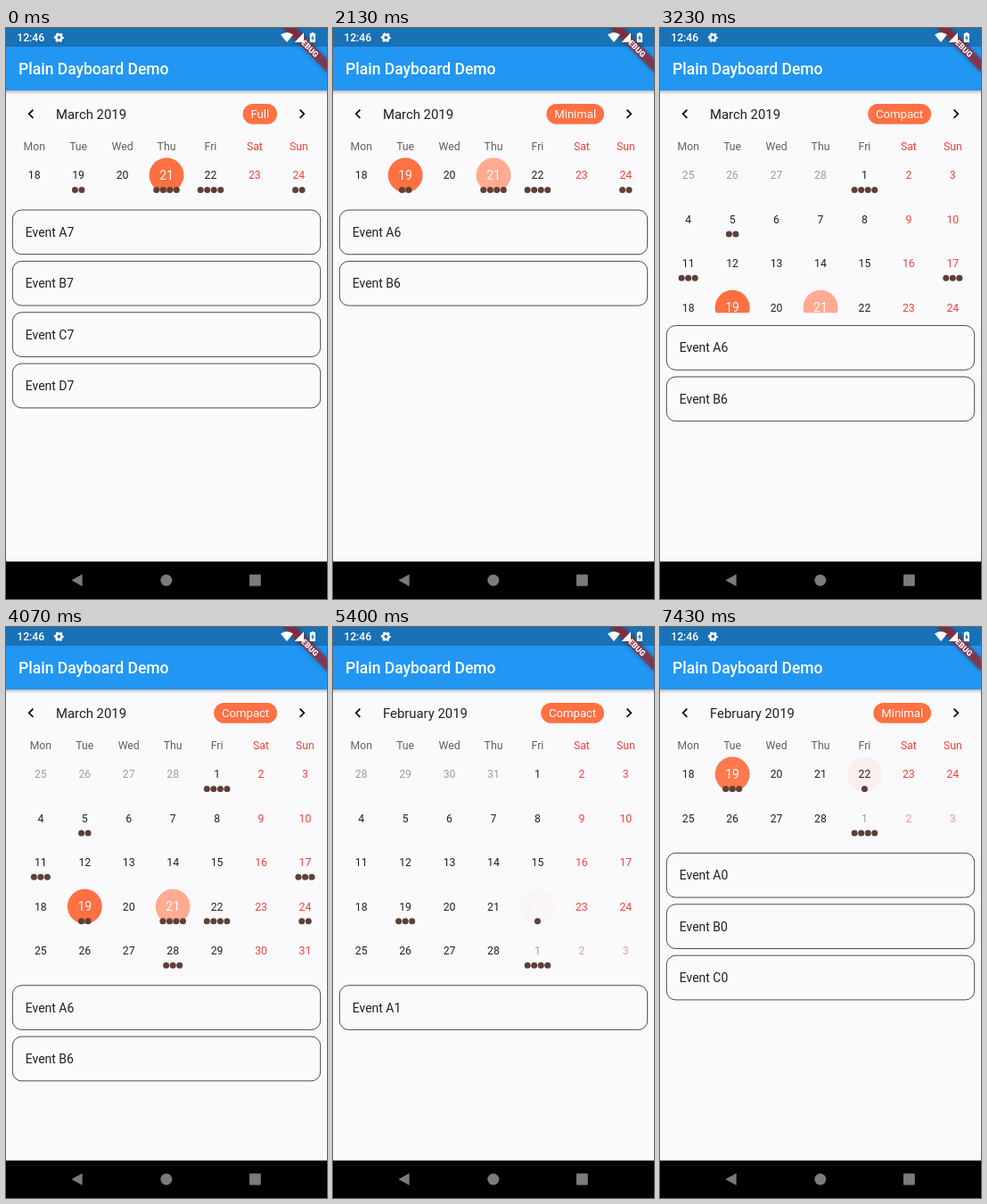
These frames come from a looping animation (360 by 640 pixels, 8 s). An HTML page:

```html
<!DOCTYPE html>
<html lang="en">
<head>
<meta charset="utf-8">
<title>Calendar</title>
<style>
  html, body { margin: 0; width: 100%; height: 100%; overflow: hidden; background: #faf9fc; }
  svg { display: block; width: 360px; height: 640px; font-family: Roboto, sans-serif; }
  .mid { text-anchor: middle; }
  .bar { filter: drop-shadow(0 1.8px 2.2px rgba(0, 0, 0, .4)); }
  .ribbon { filter: drop-shadow(0 0 2.6px rgba(0, 0, 0, .5)); }
</style>
</head>
<body>
<svg viewBox="0 0 360 640" xmlns="http://www.w3.org/2000/svg">
  <defs><clipPath id="fold"><rect id="foldBox" x="-400" y="115" width="1160" height="74"/></clipPath></defs>
  <rect width="360" height="640" fill="#faf9fc"/>
  <g id="list"></g>
  <g clip-path="url(#fold)"><g id="table"></g></g>
  <g id="header"></g>
  <g fill="none" stroke="#000" stroke-width="1.75">
    <path d="M30.4 91.7l-4.65 4.6 4.65 4.6"/>
    <path d="M329.6 91.7l4.65 4.6-4.65 4.6"/>
  </g>

  <rect class="bar" x="-10" y="-10" width="380" height="80" fill="#2196f3"/>
  <rect width="360" height="21" fill="#1971b6"/>
  <text x="14" y="52" font-size="17.5" font-weight="500" fill="#fff">Plain Dayboard Demo</text>
  <g transform="translate(360 0) rotate(45)">
    <rect class="ribbon" x="-35" y="24.5" width="70" height="10.5" fill="#b71c1c" fill-opacity=".63"/>
    <text class="mid" y="33" font-size="8.9" font-weight="900" fill="#fff">DEBUG</text>
  </g>
  <g fill="#fff">
    <text x="12.2" y="15.3" font-size="12.25" font-weight="500">12:46</text>
    <g fill="none" stroke="#fff">
      <circle cx="59.3" cy="10.7" r="3.1" stroke-width="2.5"/>
      <circle cx="59.3" cy="10.7" r="4.6" stroke-width="1.8" stroke-dasharray="2.6 2.217" stroke-dashoffset="1.3"/>
    </g>
    <path d="M308 7.4Q315 2.4 322 7.4L315 16z"/>
    <path d="M334 5.2V16H323.6z"/>
    <path d="M342.6 5h2.6v1.1h1.8v10h-6.2v-10h1.8z"/>
    <path d="M344.3 7.6v2.9h1.5l-2.3 4.2v-3h-1.5z" fill="#1971b6"/>
  </g>

  <rect y="598" width="360" height="42" fill="#000"/>
  <g fill="#7b7b7b">
    <path d="M85.6 612.2v13.6L73.4 619z"/>
    <circle cx="179.8" cy="619" r="6.5"/>
    <rect x="273" y="612.6" width="12.8" height="12.8" rx="1"/>
  </g>
</svg>

<script>
const LOOP = 8000;
const CELL = 49.43, LEFT = 7, ROW_Y = 164.9;
const ORANGE = [255, 112, 67], PEACH = [255, 171, 145];
const INK = 'rgba(0,0,0,.87)', PAPER = '#fafafa';
const WEEKDAYS = ['Mon', 'Tue', 'Wed', 'Thu', 'Fri', 'Sat', 'Sun'];
const MONTHS = { 2: 'February 2019', 3: 'March 2019' };
const FORMATS = {
  week: { rows: 1, label: 'Full', width: 38.4 },
  twoWeeks: { rows: 2, label: 'Minimal', width: 64.6 },
  month: { rows: 5, label: 'Compact', width: 70.8 }
};
const TODAY = '3/21';
const DOTS = {
  '2/19': 3, '2/22': 1, '3/1': 4, '3/5': 2, '3/11': 3, '3/17': 3,
  '3/19': 2, '3/21': 4, '3/22': 4, '3/24': 2, '3/28': 3
};

// Selections; colours fade from `start`, and stop at `end` when given.
const PICKS = [
  { at: 0, start: -1000, day: '3/21', count: 4, digit: 7 },
  { at: 1170, start: 1170, day: '3/19', count: 2, digit: 6 },
  { at: 5400, start: 5395, day: '2/22', count: 1, digit: 1 },
  { at: 7230, start: 7197, end: 7430, day: '2/19', count: 3, digit: 0 }
];
const VIEWS = [
  { at: 0, format: 'week', time: 1 },
  { at: 2125, format: 'twoWeeks', time: 220 },
  { at: 3110, format: 'month', time: 330 },
  { at: 6165, format: 'twoWeeks', time: 220 }
];
const SWIPE = { start: 4040, turn: 4390, end: 4740 };

const $ = id => document.getElementById(id);
const clamp = v => Math.max(0, Math.min(1, v));
const lastIndex = (steps, t) => steps.reduce((found, s, i) => t >= s.at ? i : found, 0);
const rgba = (c, a = 1) => `rgba(${c.map(Math.round).join()},${a.toFixed(3)})`;

// cubic-bezier(.4, 0, .2, 1)
function fastOutSlowIn(x) {
  let lo = 0, hi = 1, u = x;
  for (let i = 0; i < 24; i++) {
    u = (lo + hi) / 2;
    const bx = 1.2 * u * (1 - u) ** 2 + .6 * u * u * (1 - u) + u ** 3;
    if (bx < x) lo = u; else hi = u;
  }
  return 3 * u * u * (1 - u) + u ** 3;
}

function text(x, y, size, fill, content, cls = '') {
  return `<text class="${cls}" x="${x.toFixed(2)}" y="${y.toFixed(2)}" font-size="${size}" fill="${fill}">${content}</text>`;
}

function firstDay(month, format) {
  const d = new Date(Date.UTC(2019, month - 1, format === 'month' ? 1 : 18));
  d.setUTCDate(d.getUTCDate() - (d.getUTCDay() + 6) % 7);
  return d;
}

function circleColor(day, pick, prev, p) {
  const selected = day === pick.day, was = prev && day === prev.day;
  if (day === TODAY) {
    if (selected) return rgba(ORANGE);
    return rgba(was ? ORANGE.map((v, i) => v + (PEACH[i] - v) * p) : PEACH);
  }
  if (selected) return rgba(ORANGE, p);
  return was && p < 1 ? rgba(ORANGE, 1 - p) : '';
}

function dayColor(month, shown, weekend) {
  if (month !== shown) return weekend ? '#ef9a9a' : '#9e9e9e';
  return weekend ? '#f44336' : INK;
}

function drawTable(month, format, pick, prev, p) {
  const colX = c => LEFT + CELL * (c + .5);
  let out = WEEKDAYS.map((name, c) =>
    text(colX(c), 137.4, 12.25, c > 4 ? '#f44336' : '#616161', name, 'mid')).join('');
  const date = firstDay(month, format);
  for (let i = 0; i < FORMATS[format].rows * 7; i++) {
    const col = i % 7, x = colX(col), y = ROW_Y + CELL * Math.floor(i / 7);
    const m = date.getUTCMonth() + 1, d = date.getUTCDate(), day = m + '/' + d;
    const fill = circleColor(day, pick, prev, p);
    if (fill) out += `<circle cx="${x}" cy="${y}" r="19.46" fill="${fill}"/>`;
    const big = day === pick.day || day === TODAY;
    out += text(x, y + (big ? 5 : 4.4), big ? 14 : 12.25, big ? PAPER : dayColor(m, month, col > 4), d, 'mid');
    const n = DOTS[day] || 0;
    for (let k = 0; k < n; k++)
      out += `<circle cx="${x + (k - (n - 1) / 2) * 7.525}" cy="${y + 16.6}" r="3.5" fill="#5d4037"/>`;
    date.setUTCDate(d + 1);
  }
  return out;
}

function drawHeader(month, { label, width }) {
  return text(56, 101.7, 14.875, INK, MONTHS[month]) +
    `<rect x="${304 - width}" y="85" width="${width}" height="22.8" rx="11.4" fill="${rgba(ORANGE)}"/>` +
    text(304 - width / 2, 101.1, 13.125, '#fff', label, 'mid');
}

function drawList({ count, digit }, top) {
  let out = '';
  for (let i = 0; i < count; i++) {
    const y = top + 3.5 + 57.4 * i;
    out += `<rect x="7.35" y="${y + .35}" width="345.3" height="49.7" rx="10.15" fill="none" stroke="#000" stroke-width=".7"/>` +
      text(21.7, y + 30.2, 14, INK, 'Event ' + 'ABCD'[i] + digit);
  }
  return out;
}

function slideX(t) {
  const { start, turn, end } = SWIPE;
  if (t < start || t >= end) return 0;
  if (t < turn) return 346 * ((t - start) / (turn - start)) ** 1.6;
  return -415 * (1 - (t - turn) / (end - turn)) ** 2;
}

const drawn = {};
function put(id, markup) {
  if (drawn[id] !== markup) $(id).innerHTML = drawn[id] = markup;
}

function render(t) {
  const pi = lastIndex(PICKS, t), pick = PICKS[pi], prev = PICKS[pi - 1];
  const p = clamp((Math.min(t, pick.end || LOOP) - pick.start) / 250);
  const vi = lastIndex(VIEWS, t), view = VIEWS[vi], format = FORMATS[view.format];
  const oldRows = FORMATS[VIEWS[Math.max(0, vi - 1)].format].rows;
  const rows = oldRows + (format.rows - oldRows) * fastOutSlowIn(clamp((t - view.at) / view.time));
  const month = t < SWIPE.turn ? 3 : 2;
  const bottom = ROW_Y + CELL * (rows - .5);

  put('header', drawHeader(month, format));
  put('table', drawTable(month, view.format, pick, prev, p));
  put('list', drawList(pick, bottom + 10.5));
  $('table').setAttribute('transform', `translate(${slideX(t).toFixed(2)} 0)`);
  $('foldBox').setAttribute('height', (bottom - 115).toFixed(2));
}

const begin = performance.now();
function tick() {
  render((performance.now() - begin) % LOOP);
  requestAnimationFrame(tick);
}
tick();
</script>
</body>
</html>
```
